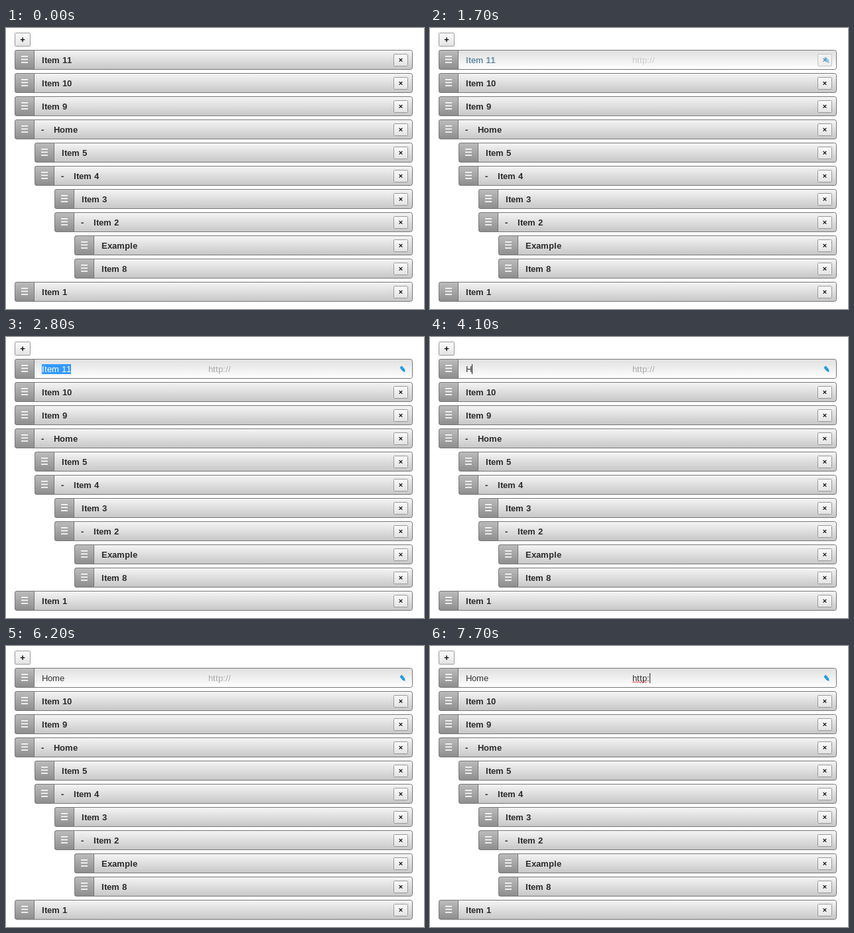
These frames come from a looping animation (630 px wide and 424 px high, 8000 ms). An HTML page with a canvas:

```html
<!DOCTYPE html>
<html lang="en">
<head>
<meta charset="utf-8">
<title>Nested list editor</title>
<style>
  html, body { margin: 0; width: 100%; height: 100%; overflow: hidden; background: #fff; }
  canvas { display: block; width: 630px; height: 424px; }
</style>
</head>
<body>
<canvas id="stage" width="630" height="424"></canvas>
<script>
const ctx = document.getElementById("stage").getContext("2d");
const LOOP = 8000;
const FACE = '"Liberation Sans", Arial, sans-serif';
const PLAIN = "13px " + FACE;
const BOLD = "bold 13px " + FACE;
const NAME_X = 54, LINK_X = 305, RIGHT = 613;
const scheme = "http:";

// label, depth, has children
const rows = [
  ["Item 11", 0], ["Item 10", 0], ["Item 9", 0], ["Home", 0, true],
  ["Item 5", 1], ["Item 4", 1, true], ["Item 3", 2], ["Item 2", 2, true],
  ["Example", 3], ["Item 8", 3], ["Item 1", 0]
];

function vertical(y, h, top, bottom) {
  const g = ctx.createLinearGradient(0, y, 0, y + h);
  g.addColorStop(0, top);
  g.addColorStop(1, bottom);
  return g;
}

function box(x, y, w, h, radii, top, bottom, border) {
  ctx.beginPath();
  ctx.roundRect(x + 0.5, y + 0.5, w - 1, h - 1, radii);
  ctx.fillStyle = vertical(y, h, top, bottom);
  ctx.fill();
  ctx.strokeStyle = border;
  ctx.lineWidth = 1;
  ctx.stroke();
}

// Text with advances snapped to whole pixels; returns the end position.
function text(str, x, y, font, color) {
  ctx.font = font;
  ctx.fillStyle = color;
  ctx.textAlign = "left";
  ctx.textBaseline = "alphabetic";
  for (const ch of str) {
    ctx.fillText(ch, x, y);
    x += Math.round(ctx.measureText(ch).width);
  }
  return x;
}

function button(x, y, w, h, sign, size) {
  box(x, y, w, h, 1, "#fcfcfc", "#e2e2e2", "#999");
  ctx.font = `bold ${size}px ${FACE}`;
  ctx.fillStyle = "#111";
  ctx.textAlign = "center";
  ctx.textBaseline = "alphabetic";
  ctx.fillText(sign, x + w / 2, y + h / 2 + size * 0.33);
}

function frame(x, y, light) {
  const [top, bottom] = light ? ["#e0e0e0", "#ffffff"] : ["#f6f6f6", "#c6c6c6"];
  box(x, y, RIGHT - x, 30, 3, top, bottom, "#777");
  box(x, y, 30, 30, [3, 0, 0, 3], "#bdbdbd", "#8c8c8c", "#777");
  ctx.fillStyle = "#fff";
  for (let i = 0; i < 3; i++) ctx.fillRect(x + 10, y + 9 + i * 4.6, 10, 1.6);
}

function caption(label, x, y, parent, color) {
  if (parent) text("-", x + 40, y + 20, BOLD, color);
  text(label, x + (parent ? 59 : 41), y + 20, BOLD, color);
  button(584, y + 6, 22, 19, "×", 11);
}

function pencil(x, y) {
  ctx.save();
  ctx.translate(x, y);
  ctx.rotate(0.88);
  ctx.fillStyle = "#2a9fe2";
  ctx.beginPath();
  ctx.roundRect(-5, -2.2, 7.6, 4.4, 1);
  ctx.moveTo(2.4, -2.2);
  ctx.lineTo(5.8, 0);
  ctx.lineTo(2.4, 2.2);
  ctx.fill();
  ctx.restore();
}

function squiggle(from, to, y) {
  ctx.beginPath();
  ctx.moveTo(from, y + 1);
  for (let x = from + 2, up = true; x <= to; x += 2, up = !up) ctx.lineTo(x, up ? y - 1 : y + 1);
  ctx.strokeStyle = "#e02020";
  ctx.lineWidth = 1;
  ctx.stroke();
}

// Number of key times already passed.
const typed = (t, keys) => keys.filter(k => t >= k).length;
const within = (t, a, b) => t >= a && t < b;

function editor(t) {
  const base = 53, ink = "#333";
  const name = t < 4100 ? "Item 11" : "Home".slice(0, typed(t, [4100, 4300, 4400, 4500]));
  const link = scheme.slice(0, typed(t, [6500, 6600, 6900, 7400, 7600]));
  const selected = within(t, 2800, 4100);

  if (selected) {
    ctx.fillStyle = "#3399ff";
    ctx.fillRect(NAME_X, 41, 44, 15);
  }
  const nameEnd = text(name, NAME_X, base, PLAIN, selected ? "#fff" : ink);
  const linkEnd = link
    ? text(link, LINK_X, base, PLAIN, ink)
    : (text(scheme + "//", LINK_X, base, PLAIN, "#a9a9a9"), LINK_X);
  if (t >= 7700) squiggle(LINK_X, 328, 54.5);
  pencil(598, 48.5);

  const inName = within(t, 1900, 2300) || within(t, 4100, 4800);
  const inLink = within(t, 4800, 5300) || within(t, 5800, 6200) || t >= 6500;
  if (inName || inLink) {
    ctx.fillStyle = "#222";
    ctx.fillRect(inName ? nameEnd : linkEnd, 41, 1, 15);
  }
}

function draw(t) {
  ctx.fillStyle = "#fff";
  ctx.fillRect(0, 0, 630, 424);
  button(13, 7, 24, 21, "+", 13);

  const hover = t >= 1200;
  const fade = t < 1700 ? 0 : t < 1900 ? 0.5 : 1;
  rows.forEach(([label, depth, parent], i) => {
    const x = 13 + depth * 30, y = 33 + i * 35;
    const active = i === 0 && hover;
    frame(x, y, active);
    if (active) ctx.globalAlpha = 1 - fade;
    if (!active || fade < 1) caption(label, x, y, parent, active ? "#2f95dc" : "#2b2b2b");
    if (active && fade) {
      ctx.globalAlpha = fade;
      editor(t);
    }
    ctx.globalAlpha = 1;
  });
}

const start = performance.now();
function tick() {
  draw((performance.now() - start) % LOOP);
  requestAnimationFrame(tick);
}
tick();
</script>
</body>
</html>
```
